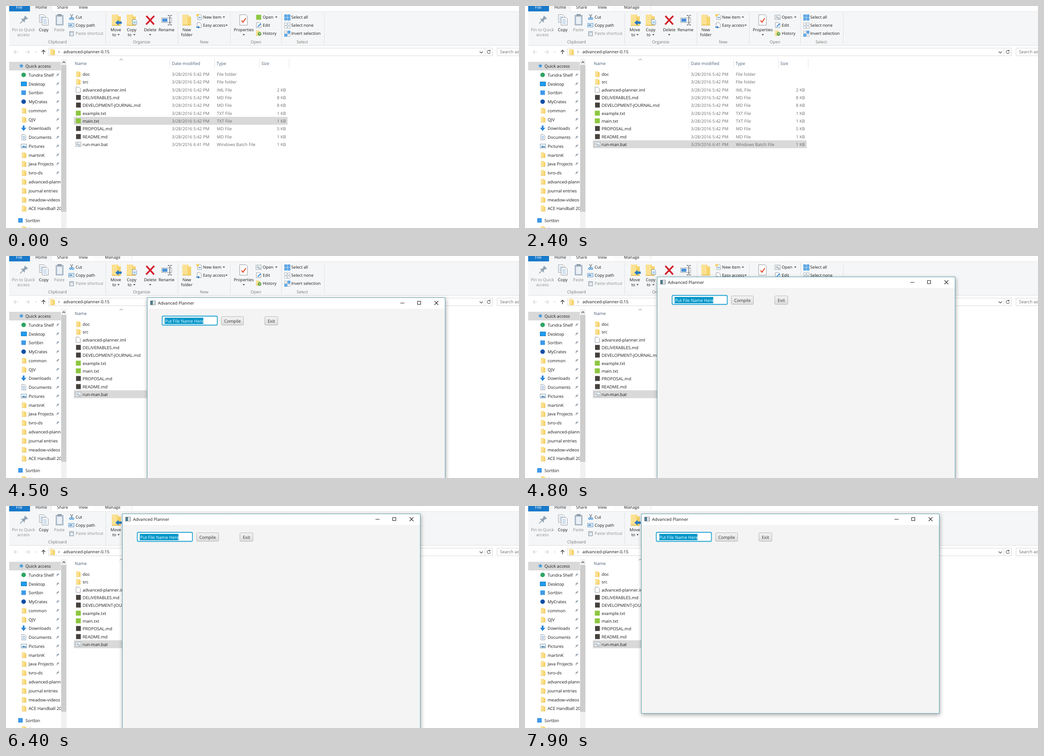
Write an HTML page that moves like this. It is 1135x493 px and loops after 8 s.

```html
<!DOCTYPE html>
<html lang="en">
<head>
<meta charset="utf-8">
<title>Advanced Planner</title>
<style>
html, body { margin: 0; width: 100%; height: 100%; overflow: hidden; background: #fff; }
svg { display: block; width: 1135px; height: 493px; }
text { font-family: "Open Sans", "Noto Sans", sans-serif; font-size: 9.5px; text-rendering: geometricPrecision; white-space: pre; }
.ribbon text { font-size: 9.15px; }
</style>
</head>
<body>
<svg id="stage" viewBox="0 0 1135 493" xmlns="http://www.w3.org/2000/svg"></svg>
<script>
const DURATION = 8000;
const INK = '#1a1a1a', DIM = '#8c8c8c', GREY = '#6d6d6d', BLUE = '#2b88d8';

// Markup helpers
const rect = (x, y, w, h, fill, more = '') => `<rect x="${x}" y="${y}" width="${w}" height="${h}" fill="${fill}" ${more}/>`;
const line = (d, color, width = 1, more = '') => `<path d="${d}" fill="none" stroke="${color}" stroke-width="${width}" ${more}/>`;
const shape = (d, fill, more = '') => `<path d="${d}" fill="${fill}" ${more}/>`;
const disc = (x, y, r, fill) => `<circle cx="${x}" cy="${y}" r="${r}" fill="${fill}"/>`;
const text = (x, y, s, fill = INK, anchor = 'start') => `<text x="${x}" y="${y}" fill="${fill}" text-anchor="${anchor}">${s}</text>`;
const label = (x, y, s, fill) => text(x, y, s, fill, 'middle');
const at = (x, y, body, k = 1) => `<g transform="translate(${x} ${y}) scale(${k})">${body}</g>`;
const box = (x, y, w, h, fill, stroke) => rect(x + .5, y + .5, w - 1, h - 1, fill, `stroke="${stroke}"`);
const vline = (x, y1, y2, color) => rect(x, y1, 1, y2 - y1, color);
const drop = (x, y) => shape(`M${x - 2.5} ${y - 1.5}h5l-2.5 3z`, '#444');

// Icons, each drawn around its own centre
const folder = (x, y, k = 1) => at(x, y,
  shape('M-5-6h7v2h3v10h-10z', '#f6d36b') + shape('M-5-6h6v12h-6z', '#fbe193') + line('M-5 6h10', '#e5b94a', .8), k);
const page = (x, y, w, h, stroke = '#8a8f96') =>
  shape(`M${x} ${y}h${w - 3}l3 3v${h - 3}h${-w}z`, '#fff', `stroke="${stroke}" stroke-width=".9"`);
const pin = (x, y, k, fill) => at(x, y,
  `<g transform="rotate(45)">${shape('M-2.5-5h5v1.2l-1 .8v2.5l2 2h-7l2-2v-2.5l-1-.8z', fill)}${rect(-.5, 1, 1, 5, fill)}</g>`, k);
const star = (x, y) => {
  let d = '';
  for (let i = 0; i < 10; i++) {
    const r = i % 2 ? 2.3 : 5.5, a = i * Math.PI / 5 - 1.4;
    d += `${i ? 'L' : 'M'}${(x + r * Math.cos(a)).toFixed(1)} ${(y + r * Math.sin(a)).toFixed(1)}`;
  }
  return shape(d + 'z', '#3a96dd');
};
const batch = (x, y) => box(x - 6.5, y - 5.5, 13, 11, '#f4f7f9', '#9aa5ad') +
  rect(x - 6, y - 5, 12, 2, '#cfd8de') +
  `<g fill="none" stroke="#8a9aa5"><circle cx="${x - 2}" cy="${y}" r="1.6"/><circle cx="${x + 2}" cy="${y + 2}" r="1.8"/></g>`;
const fileIcons = {
  dir: (x, y) => folder(x, y),
  blank: (x, y) => page(x - 5, y - 6, 9.5, 12),
  md: (x, y) => rect(x - 5, y - 5.5, 10.5, 11, '#45413d'),
  txt: (x, y) => rect(x - 5.5, y - 5.5, 11, 11, '#8cc63f'),
  bat: batch
};

function ribbon() {
  let s = rect(7, 12, 1128, 75, '#f5f6f7') + rect(7, 87, 1128, 1, '#dedfe1') +
    rect(100, 12, 1035, 1, '#e4e5e7') + rect(7, 0, 46, 12, '#1979ca') +
    rect(53, 0, 47, 13, '#f5f6f7') + vline(53, 0, 12, '#e4e5e7') + vline(100, 0, 12, '#e4e5e7');
  s += text(22, 6, 'File', '#fff') + text(65, 6, 'Home') + text(113, 6, 'Share') + text(161, 6, 'View');
  [220, 380, 496, 609, 704].forEach(x => s += vline(x, 15, 85, '#e0e1e3'));
  [[114, 'Clipboard'], [300, 'Organize'], [438.5, 'New'], [553, 'Open'], [655.5, 'Select']]
    .forEach(([x, name]) => s += label(x, 83, name, '#777'));

  // Clipboard
  s += pin(39, 31, 1.8, '#93a5b5') + label(38.5, 56, 'Pin to Quick', DIM) + label(38.5, 67, 'access', DIM);
  const lines = (x, y) => line(`M${x} ${y}h8m-8 3h8m-8 3h8m-8 3h8`, '#7fa9d6', 1);
  s += page(74, 19.5, 13, 17) + lines(76, 24) + page(80, 25.5, 13.5, 17) + lines(82.5, 30) + label(83.5, 56, 'Copy');
  s += box(110, 20, 17, 23, '#b4c2d0', '#98a9ba') + rect(113, 24, 11, 16, '#eaf0f6') + rect(114, 18, 9, 4, '#8d9aa8') + label(118, 56, 'Paste', DIM);
  s += line('M142.500 18l4 8M148 18l-4 8', '#6b7785', 1.2) +
    `<g fill="none" stroke="${BLUE}" stroke-width="1.3"><circle cx="142.500" cy="28" r="1.900"/><circle cx="148" cy="28" r="1.900"/></g>` + text(154, 28, 'Cut');
  s += box(138, 38, 13, 9, '#d9eaf8', '#6a9cc9') + line('M140 44l2-3 1 3 2-3 1 3', '#245f99', 1) + text(154, 46, 'Copy path');
  s += box(140, 56, 10, 11, '#c3ccd5', '#9caab7') + rect(143, 60, 5, 5, '#eef2f5') + text(154, 64, 'Paste shortcut', DIM);

  // Organize
  s += folder(244, 31, 2) + shape('M256 34.500h-7v-3.500l-7 6 7 6v-3.500h7z', '#2778c4') + label(243, 56, 'Move') + label(239.5, 67, 'to') + drop(249, 64);
  s += folder(277, 31, 2) + page(280, 30, 9, 11, '#4d83bd') + line('M282 35h5m-5 2.500h5', BLUE) + label(278, 56, 'Copy') + label(273.5, 67, 'to') + drop(284, 64);
  s += line('M310.500 22l17 19M328 22l-18 19', '#d3202b', 3.6) + label(319, 56, 'Delete') + drop(319, 64);
  s += box(344, 26, 23, 11, '#fff', '#8b98a6') + rect(346, 28, 11, 7, '#4a90d4') +
    line('M358 21h3.500m2 0h3.500M362.500 22v19M358 42h3.500m2 0h3.500', '#555', 1.3) + label(355, 56, 'Rename');

  // New
  s += folder(400, 31, 1.9) + label(400, 56, 'New') + label(400, 67, 'folder');
  s += page(424, 19, 9, 11) + rect(421, 18, 6, 5, '#f6d36b') + rect(426, 24, 5, 3, '#7fb2e5') + text(436, 28, 'New item') + drop(482, 25);
  s += page(423, 37, 9, 11) + shape('M421 46h4v-2l4 3-4 3v-2h-4z', '#2778c4') + text(436, 46, 'Easy access') + drop(488, 43);

  // Open
  s += page(517, 19.5, 17, 23) + line('M521 32l3.500 4 6-9', '#e2492d', 2.2) + label(526, 56, 'Properties') + drop(526, 64);
  s += `<g id="openTxt">${fileIcons.txt(559, 25)}</g><g id="openBat">${batch(559, 25)}</g>` + text(568, 28, 'Open') + drop(598, 25);
  s += page(554, 37, 10, 11) + line('M557 46l7-7', BLUE, 2) + text(568, 46, 'Edit');
  s += folder(558, 60, .9) + disc(561, 62, 4, '#69a84f') + line('M561 59.500v2.500h2', '#fff') + text(568, 64, 'History');

  // Select
  ['Select all', 'Select none', 'Invert selection'].forEach((name, row) => {
    for (let i = 0; i < 4; i++) {
      const on = row === 0 || (row === 2 && (i === 1 || i === 2));
      s += box(616 + (i % 2) * 7, 19 + row * 18 + (i >> 1) * 7, 6, 6, on ? '#6db5ee' : '#fff', on ? '#2b88d8' : '#a9b4bf');
    }
    s += text(631, 28 + row * 18, name);
  });

  const manage = `<g id="manage">${rect(194, 0, 84, 12, '#fcfcfc')}${vline(278, 0, 8, '#e2e3e5')}${text(219, 6, 'Manage')}</g>`;
  return `<g class="ribbon">${s}${manage}</g>`;
}

function addressBar() {
  return line('M27 102h-9m4-4l-4 4 4 4', '#d0d0d0', 1.2) + line('M43 102h9m-4-4l4 4-4 4', '#d0d0d0', 1.2) +
    line('M64 101l2 2 2-2', '#c8c8c8') + line('M83 107v-9m-4 4l4-4 4 4', '#444', 1.4) +
    box(94, 93, 966, 18, '#fff', '#d9d9d9') + box(1059, 93, 18, 18, '#fff', '#d9d9d9') +
    folder(103, 102, 1.05) + line('M116 99.500l2.500 2.500-2.500 2.500', '#555') + text(127, 105, 'advanced-planner-0.15') +
    line('M1048 101l3.500 3.500 3.500-3.500', '#555', 1.3) +
    line('M1070.500 99.300a3.600 3.600 0 1 0 1.200 3M1071 97v3h-3', '#555', 1.1) +
    box(1086, 93, 60, 18, '#fff', '#d9d9d9') + text(1093, 105, 'Search advanced-planner-0.15', GREY);
}

const places = ['Tundra Shelf', 'Desktop', 'Sortbin', 'MyCrates', 'common', 'QJV', 'Downloads', 'Documents', 'Pictures',
  'martinK', 'Java Projects', 'tvro-ds', 'advanced-planner', 'journal entries', 'meadow-videos', 'ACE Handball 2015'];
const placeIcons = {
  0: y => disc(39, y, 5, '#2da562'),
  1: y => box(33, y - 5, 13, 10, '#1f9df0', '#1676bd'),
  2: y => rect(34, y - 5, 10, 10, '#3d9ae8'),
  3: y => disc(39, y, 5, '#0f4fa8'),
  6: y => shape(`M37 ${y - 6}h4v5h4l-6 7-6-7h4z`, '#2c86d8'),
  7: y => page(35, y - 6, 9, 12) + line(`M37 ${y - 2}h5m-5 2.500h5m-5 2.500h5`, '#5d9bd5'),
  8: y => box(33, y - 5, 13, 10, '#eaf5fd', '#8ea2b2') + shape(`M35 ${y + 3}l3-4 3 2 2-1 2 3z`, '#4f86b5')
};

function sidebar() {
  let s = rect(7, 124, 115, 19, '#d9d9d9') + star(34, 133) + text(43, 137, 'Quick access');
  places.forEach((name, i) => {
    const y = Math.round((153 + i * 19.77) * 2) / 2;
    s += (placeIcons[i] || (v => folder(40, v)))(y) + text(50, y + 3.5, name);
    if (i < 12) s += rect(106.5, y - 7, 15, 14, '#fff') + pin(114, y, .72, '#8796a3');
  });
  s += rect(27, 471, 10, 10, '#3d9ae8') + text(43, 479.5, 'Sortbin') + folder(40, 495) + text(50, 498.5, 'Apps');
  return `<g clip-path="url(#nav)">${s}</g>` + rect(122, 118, 12, 375, '#f1f1f1') +
    rect(122, 131, 11.5, 326, '#cdcdcd') + line('M125 126.500l3-3 3 3', '#505050', 1.5);
}

const files = [
  ['dir', 'doc', 'File folder', ''], ['dir', 'src', 'File folder', ''],
  ['blank', 'advanced-planner.iml', 'IML File', 2], ['md', 'DELIVERABLES.md', 'MD File', 8],
  ['md', 'DEVELOPMENT-JOURNAL.md', 'MD File', 8], ['txt', 'example.txt', 'TXT File', 1],
  ['txt', 'main.txt', 'TXT File', 1], ['md', 'PROPOSAL.md', 'MD File', 5],
  ['md', 'README.md', 'MD File', 1], ['bat', 'run-man.bat', 'Windows Batch File', 1]
];
const rowY = i => 151 + i * 17.33;

function fileList() {
  let s = rect(138, 117, 224, 21, '#d9ebf9', 'id="header"');
  [362, 461, 560, 626].forEach(x => s += vline(x, 117, 138, '#e3e3e3'));
  [[152, 'Name'], [367, 'Date modified'], [466, 'Type'], [565, 'Size']].forEach(([x, name]) => s += text(x, 131, name, '#4c607a'));
  s += line('M251.500 120.500l3.500-3 3.500 3', '#777');
  s += rect(150, 0, 473, 17.5, 'none', 'id="hover"') + rect(150, 0, 473, 17.5, 'none', 'id="chosen"');
  files.forEach(([icon, name, type, size], i) => {
    const y = Math.round(rowY(i)), base = y + 3.5;
    s += fileIcons[icon](160, y) + text(169.5, base, name) +
      text(367, base, `3/${i === 9 ? '29/2016 6:41' : '28/2016 5:42'} PM`, GREY) + text(466.5, base, type, GREY);
    if (size) s += text(619.5, base, size + ' KB', GREY, 'end');
  });
  return s;
}

function planner() {
  const button = (x, w, name) => rect(x + .5, 42.5, w - 1, 19, 'url(#face)', 'rx="2.500" stroke="#b8b8b8"') + label(x + w / 2, 55.5, name, '#333');
  return `<g id="win">` + rect(0, 0, 660, 400, '#f4f4f4', 'id="frame" filter="url(#shade)"') +
    rect(0, 0, 660, 25, '#fff') + rect(.5, .5, 659, 400, 'none', 'id="edge" stroke="#5fa3b2"') +
    box(7, 7, 12, 10, '#fff', '#7d8790') + rect(8, 8, 5, 8, '#4e7c8c') + rect(14, 9, 4, 6, '#d5dde2') +
    text(24, 16, 'Advanced Planner') +
    line('M560.500 12.500h9M598.500 8.500h7v7h-7zM636 8l8.500 8.500M644.500 8l-8.500 8.500', '#222', 1.1) +
    rect(33.5, 41.5, 122, 20, '#fff', 'rx="2.500" stroke="#1fa3d1" stroke-width="1.800"') +
    rect(40, 45, 84.5, 14, '#0096c9') + rect(39, 45, 1, 14, '#0096c9', 'id="caret"') +
    text(40, 55.5, 'Put File Name Here', '#fff') +
    button(164, 50, 'Compile') + button(260, 30, 'Exit') + '</g>';
}

const stage = document.getElementById('stage');
stage.innerHTML = `<defs>
  <clipPath id="nav"><rect x="7" y="118" width="114.500" height="375"/></clipPath>
  <linearGradient id="face" x2="0" y2="1"><stop offset="0" stop-color="#f3f3f3"/><stop offset="1" stop-color="#dcdcdc"/></linearGradient>
  <filter id="shade" x="-5%" y="-5%" width="110%" height="112%"><feDropShadow dx="1" dy="3" stdDeviation="5" flood-color="#000" flood-opacity=".35"/></filter>
</defs>` + rect(0, 0, 1135, 493, '#fff') + ribbon() + addressBar() + sidebar() + fileList() + planner();

const el = {};
stage.querySelectorAll('g[id], rect[id]').forEach(n => el[n.id] = n);
const set = (name, attrs) => { for (const k in attrs) el[name].setAttribute(k, attrs[k]); };
const show = (name, on) => set(name, { visibility: on ? 'visible' : 'hidden' });

// Piecewise linear track of [time, ...values]
function sample(track, t) {
  const i = track.findIndex(k => k[0] > t);
  if (i < 0) return track[track.length - 1].slice(1);
  if (i === 0) return track[0].slice(1);
  const a = track[i - 1], b = track[i], p = (t - a[0]) / (b[0] - a[0]);
  return a.slice(1).map((v, j) => v + (b[j + 1] - v) * p);
}
const latest = (track, t) => track.reduce((v, k) => t >= k[0] ? k[1] : v, -1);

const hoverTrack = [[700, 1], [800, 4], [900, 9], [1100, 8], [1300, 9], [1700, -1]];
const moveTrack = [[4200, 475, 212], [4300, 425, 150], [4500, 312, 92], [5000, 279, 16],
  [5200, 279, -20], [5600, 247, 4], [5900, 257, 17]];
const bottomTrack = [[6700, 540], [7200, 490], [7600, 467], [7900, 461]];

function draw(time) {
  const t = Math.floor(time / 100) * 100;
  const hover = latest(hoverTrack, t), launched = t >= 1700;

  show('header', t === 600);
  set('hover', { y: rowY(hover) - 8.75, fill: hover < 0 ? 'none' : '#e5f3ff' });
  set('chosen', { y: rowY(launched ? 9 : 6) - 8.75, fill: launched && t < 2400 ? '#cce8ff' : '#d9d9d9' });
  show('manage', t >= 1800);
  show('openBat', t >= 1800);
  show('openTxt', t < 1800);

  const open = t >= 4200;
  show('win', open);
  const [x, y] = sample(moveTrack, t).map(Math.round);
  const h = t < 6800 ? 560 : Math.round(sample(bottomTrack, t)[0]) - y;
  set('win', { transform: `translate(${x} ${y})` });
  set('frame', { height: h });
  set('edge', { height: h - 1 });
  show('caret', open && Math.floor((t - 6400) / 500) % 2 === 0);
}

const start = performance.now();
function tick() {
  draw((performance.now() - start) % DURATION);
  requestAnimationFrame(tick);
}
tick();
</script>
</body>
</html>
```
